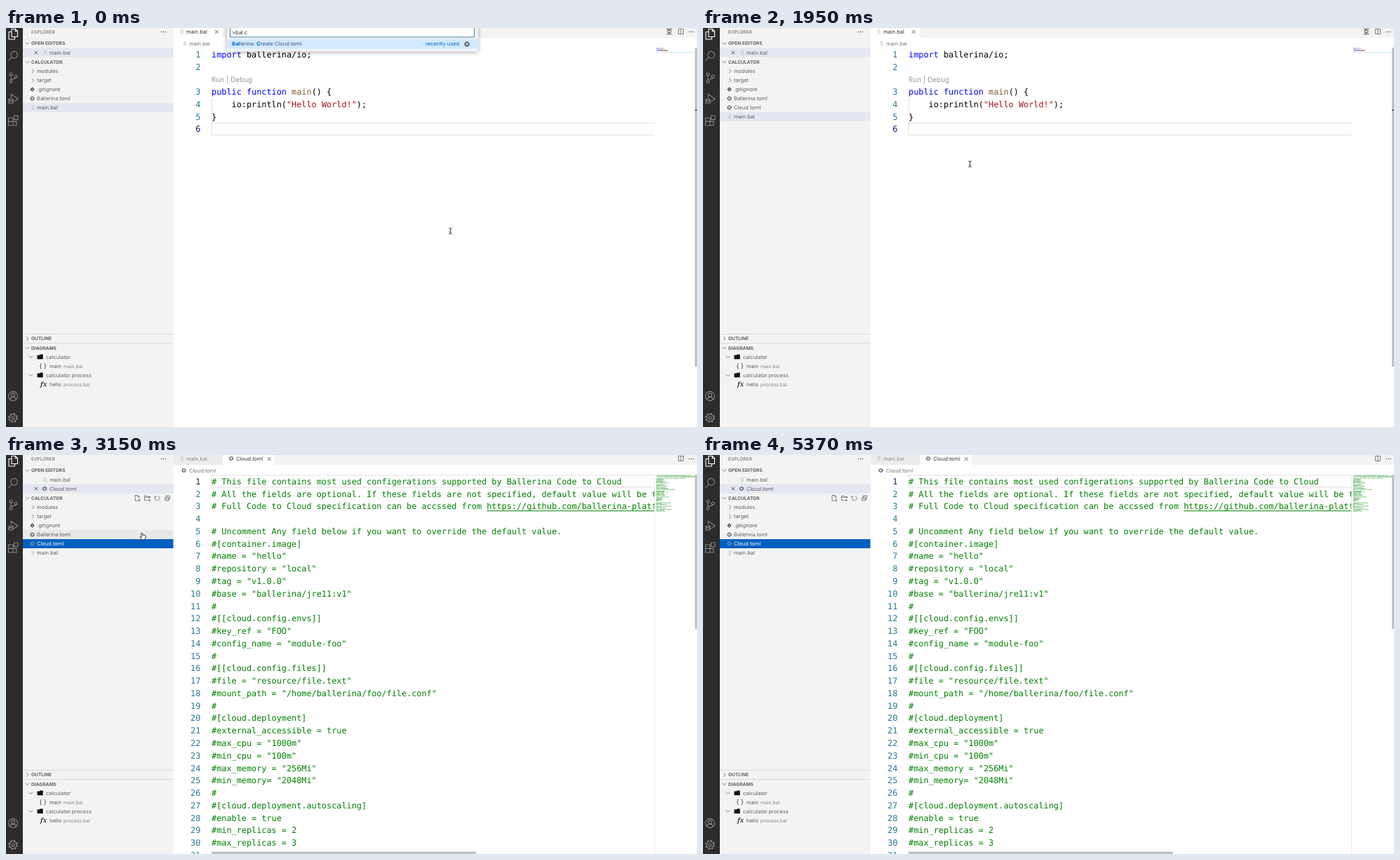
These frames come from a looping animation (985x569 px, 5.47 s). An HTML page:

```html
<!DOCTYPE html>
<html lang="en">
<head>
<meta charset="utf-8">
<title>Create Cloud.toml</title>
<style>
html, body { margin: 0; width: 100%; height: 100%; overflow: hidden; background: #fff; }
svg { display: block; position: absolute; left: 0; top: 0; }
text { font: 7.5px Inter, "Open Sans", sans-serif; fill: #616161; white-space: pre; text-rendering: geometricPrecision; }
text.head { font-size: 6.6px; font-weight: 700; }
text.cap { font-size: 6.6px; }
text.sub { font-size: 6.85px; fill: #858585; }
text.it { font-style: italic; }
text.on { fill: #fff; }
text.dark { fill: #333; }
text.dim { fill: #8a8a8a; }
text.crumb { fill: #767676; }
text.lens { font-size: 10px; fill: #999; }
text.code, text.num { font: 11.85px "DejaVu Sans Mono", "Liberation Mono", monospace; fill: #000; }
text.num { fill: #237893; text-anchor: end; }
text.num.cur { fill: #0b216f; }
text.cmt { fill: #008000; }
.kw { fill: #00f; } .fn { fill: #795e26; } .str { fill: #a31515; }
.hit { fill: #0066bf; font-weight: 700; }
.line { fill: none; stroke: #616161; stroke-width: .8; }
.bar { fill: none; stroke: #868686; stroke-width: 1.1; }

.first, .second, .palette, .caret, .cloud, .own, .tools, .hover, .picked, .fade, .late,
.away, .slider, .mouse, .beam, .hand, .arrow { animation: 5470ms step-end infinite; }
.first { animation-name: first; }
.second { animation-name: second; }
.palette { animation-name: palette; }
.caret { animation-name: caret; }
.cloud { animation-name: cloud; }
.own { animation-name: own; }
.tools { animation-name: tools; }
.hover { animation-name: hover; }
.picked { animation-name: picked; }
.fade { animation-name: fade; }
.late { animation-name: late; }
.away { animation-name: away; }
.slider { animation-name: slider; }
.mouse { animation-name: mouse; }
.beam { animation-name: beam; }
.hand { animation-name: hand; }
.arrow { animation-name: arrow; }

@keyframes first { 0% { opacity: 1 } 54.844%, 100% { opacity: 0 } }
@keyframes second { 0% { opacity: 0 } 54.844%, 100% { opacity: 1 } }
@keyframes palette { 0% { opacity: 1 } 2.742%, 100% { opacity: 0 } }
@keyframes caret {
  0%, 10.968%, 30.164%, 46.617%, 100% { opacity: 0 }
  2.742%, 19.195%, 38.391% { opacity: 1 }
}
@keyframes cloud { 0% { opacity: 0 } 16.453%, 100% { opacity: 1 } }
@keyframes own { 0% { transform: translateY(-13px) } 16.453%, 100% { transform: none } }
@keyframes tools { 0% { opacity: 0 } 41.133%, 100% { opacity: 1 } }
@keyframes hover { 0% { opacity: 0 } 43.875%, 100% { opacity: 1 } }
@keyframes picked { 0% { opacity: 0 } 52.102%, 100% { opacity: 1 } }
@keyframes fade { 0% { opacity: 1 } 52.102%, 100% { opacity: .35 } }
@keyframes late { 0% { opacity: 0 } 57.586%, 100% { opacity: 1 } }
@keyframes away { 0% { opacity: 1 } 65.813%, 100% { opacity: 0 } }
@keyframes slider { 0%, 98.171%, 100% { opacity: 0 } 81.901% { opacity: 1 } }
@keyframes beam { 0%, 68.555% { opacity: 1 } 41.133%, 81.901%, 100% { opacity: 0 } }
@keyframes hand { 0%, 68.555%, 100% { opacity: 0 } 41.133% { opacity: 1 } }
@keyframes arrow { 0%, 95.612%, 100% { opacity: 0 } 81.901% { opacity: 1 } }
@keyframes mouse {
  0% { transform: translate(633.5px, 289.5px) }
  27.422% { transform: translate(618px, 283px) }
  30.164% { transform: translate(555px, 259px) }
  32.906% { transform: translate(468px, 227px) }
  35.648% { transform: translate(380.5px, 194px) }
  38.391% { transform: translate(294px, 158px) }
  41.133% { transform: translate(222px, 132px) }
  43.875% { transform: translate(199px, 120px) }
  46.617% { transform: translate(195px, 116px) }
  65.813% { transform: translate(206px, 126px) }
  68.555% { transform: translate(262px, 148px) }
  71.297% { transform: translate(318px, 178px) }
  73.857% { transform: translate(354px, 197px) }
  79.341% { transform: translate(760px, 430px) }
  81.901% { transform: translate(955px, 542px) }
  84.643% { transform: translate(956px, 549px) }
  87.385% { transform: translate(957px, 556px) }
  90.127% { transform: translate(957px, 562px) }
  92.870%, 100% { transform: translate(958px, 569px) }
}
</style>
</head>
<body>
<svg id="stage" width="985" height="569" viewBox="0 0 985 569"></svg>
<script>
const text = (x, y, s, cls = '') => `<text x="${x}" y="${y}" class="${cls}">${s}</text>`;
const label = (x, mid, s, cls) => text(x, mid + 2.7, s, cls);
const rect = (x, y, w, h, fill, more = '') => `<rect x="${x}" y="${y}" width="${w}" height="${h}" fill="${fill}" ${more}/>`;
const path = (d, more = 'class="line"') => `<path d="${d}" ${more}/>`;
const at = (x, y, s) => `<g transform="translate(${x} ${y})">${s}</g>`;
const group = (cls, s) => `<g class="${cls}">${s}</g>`;

// Small icons
const right = (x, y) => at(x, y, path('M-1.4-2.8 1.4 0-1.4 2.8'));
const down = (x, y) => at(x, y, path('M-2.8-1.4 0 1.4 2.8-1.4'));
const cross = (x, y) => at(x, y, path('M-2.5-2.5 2.5 2.5M2.5-2.5-2.5 2.5', 'class="line" style="stroke:#444"'));
const doc = (x, y, c = '#c2c5c6') => at(x, y, path('M-2.2-2.6h4M-2.2-.9h4.6M-2.2.8h4M-2.2 2.5h4.6', `fill="none" stroke="${c}" stroke-width=".8"`));
const gear = (x, y, c = '#52636b', k = 1) => at(x, y, `<g transform="scale(${k})" fill="none" stroke="${c}">
  <circle r="2" stroke-width="1.2"/><circle r="3" stroke-width="1" stroke-dasharray="1.18 1.18"/></g>`);
const diamond = (x, y) => at(x, y, rect(-2.3, -2.3, 4.6, 4.6, '#41535b', 'rx=".5" transform="rotate(45)"') +
  path('M-.8-1.2 1 .6M0-.6V1.6', 'stroke="#f3f3f3" stroke-width=".7"'));
const folder = (x, y) => at(x, y, path('M-4-2.6H-.6L.4-3.6H4.2V3.2H-4Z', 'fill="#111"'));
const dots = (x, y) => [-3, 0, 3].map(d => `<circle cx="${x + d}" cy="${y}" r=".75" fill="#555"/>`).join('');

const tools = y =>
  at(187, y, path('M1-4H-3V4H0M1-4 3-2V0M1-4V-2H3M2.7 1V5M.7 3h4')) +
  at(201.5, y, path('M-.5 3.2H-4V-3.2H-1L0-2.2H4V0M-4-1.2H4M2.6 1V5M.6 3h4')) +
  at(215.5, y, path('M-2.4-2.4A3.4 3.4 0 1 0 1.6-3M-3.4-3.6V-1.6H-1')) +
  at(230, y, path('M-3.2-1.2H1.6V3.4H-3.2ZM-1.6-1.2V-3.4H3.4V1.6H1.6M-2 1.1H.4'));

function lowerPanels(dy) {
  return at(0, dy,
    rect(24, 436, 214.5, 1, '#dadada') + right(30.5, 443) + label(36, 442.7, 'OUTLINE', 'head') +
    rect(24, 449, 214.5, 1, '#dadada') + down(30.5, 456.3) + label(36, 455.8, 'DIAGRAMS', 'head') +
    down(35.5, 469) + folder(48.5, 469) + label(57, 469, 'calculator') +
    text(47.6, 484.8, '{ }', 'dark" style="font-size:9px') + label(62, 482, 'main') + label(82, 482, 'main.bal', 'sub') +
    down(35.5, 495) + folder(48.5, 495) + label(57, 495, 'calculator.process') +
    text(49, 511, 'fx', 'it dark" style="font:italic bold 9px Noto Serif,serif') +
    label(62, 508, 'hello') + label(82, 508, 'process.bal', 'sub'));
}

const explorerTop = rect(24, 0, 214.5, 569, '#f3f3f3') + label(36, 5, 'EXPLORER', 'cap') + dots(224.5, 5.5) +
  down(30.5, 22) + label(36, 21.7, 'OPEN EDITORS', 'head');

const treeTop = y => down(30.5, y) + label(36, y - .2, 'CALCULATOR', 'head') +
  right(38.5, y + 13) + label(44, y + 13, 'modules') +
  right(38.5, y + 26) + label(44, y + 26, 'target') +
  diamond(37.5, y + 39) + label(44, y + 39, '.gitignore') +
  gear(37.5, y + 52) + label(44, y + 52, 'Ballerina.toml');

const sideOne = explorerTop +
  rect(24, 28.5, 214.5, 13, '#e4e6f1') + cross(43, 35) + doc(56, 35) + label(62, 35, 'main.bal') +
  group('hover', rect(24, 107, 214.5, 13, '#e8e8e8')) +
  treeTop(48.5) + group('tools', tools(48.5)) +
  group('cloud', gear(37.5, 113.5) + label(44, 113.5, 'Cloud.toml')) +
  group('own', rect(24, 120, 214.5, 13, '#e4e6f1') + doc(38.5, 126.5) + label(44, 126.5, 'main.bal') +
    group('picked', rect(24, 120, 214.5, 13, '#0060c0') + doc(38.5, 126.5) + label(44, 126.5, 'main.bal', 'on'))) +
  lowerPanels(0);

const sideTwo = explorerTop +
  doc(56, 35) + label(62, 35, 'main.bal') +
  rect(24, 41.5, 214.5, 13, '#e4e6f1') + cross(43, 48) + gear(55, 48) + label(62, 48, 'Cloud.toml', 'it') +
  group('away', rect(24, 107, 214.5, 13, '#e8e8e8')) +
  treeTop(61.5) + tools(61.5) +
  rect(24, 120, 214.5, 13, '#0060c0') + gear(37.5, 126.5, '#6f93ad') + label(44, 126.5, 'Cloud.toml', 'on') +
  doc(38.5, 139.5) + label(44, 139.5, 'main.bal') +
  lowerPanels(13);

// Editors
const rowY = i => 41.8 + 17.77 * i;
const number = (i, n, cur) => text(277.3, rowY(i), n, cur ? 'num cur' : 'num');
const currentLine = y => rect(293, y, 640, 17, 'none', 'stroke="#e4e4e4" stroke-width="1.2"');
const split = at(962, 5, path('M-3.5-3.5h7v7h-7ZM0-3.5v7'));
const tabBar = rect(238.5, 0, 747, 14, '#f3f3f3');

const span = (c, s) => `<tspan class="${c}">${s}</tspan>`;
const program = [
  [0, 1, span('kw', 'import') + ' ballerina/io;'],
  [1, 2, ''],
  [3, 3, span('kw', 'public function') + ' ' + span('fn', 'main') + '() {'],
  [4, 4, '    io:println(' + span('str', '"Hello World!"') + ');'],
  [5, 5, '}'],
  [6, 6, '']
];

const miniOne = rect(927, 28.6, 4, .9, '#66f') + rect(931.5, 28.6, 7, .9, '#999') +
  rect(927, 30.8, 9, .9, '#66f') + rect(936.5, 30.8, 6, .9, '#a98') +
  rect(929, 32, 6, .9, '#999') + rect(935, 32, 9, .9, '#c66') + rect(927, 33.2, 1, .8, '#999') +
  rect(927, 34.4, 55, .9, '#c9e4f5');

const editorOne = tabBar + rect(239, 0, 70, 14, '#fff') +
  doc(251, 5) + label(257, 5, 'main.bal', 'dark') + cross(300.3, 5.5) +
  at(945.5, 5, path('M-4-3.5h8M-4 3.7h8M-2.4-1.4h4.8v2.8h-4.8ZM0-3.5v2M0 1.4v2', 'class="line" style="stroke:#333"')) +
  split + dots(977, 5.5) +
  doc(255, 22) + label(261, 22, 'main.bal', 'crumb') +
  `<g clip-path="url(#pane)">${currentLine(135.6)}</g>` +
  program.map(([i, n, s]) => number(i, n, n === 6) + text(293, rowY(i), s, 'code')).join('') +
  text(292.8, 76.5, 'Run | Debug', 'lens') + rect(293, 100, .7, 17.7, '#d3d3d3') +
  miniOne + group('fade', rect(982, 28, 3, 455, '#c1c1c1')) + rect(982, 116.6, 3, 1.4, '#444') +
  group('caret', rect(292.8, 135.3, 1.3, 17.6, '#000'));

const intro = '# Full Code to Cloud specification can be accssed from ';
const link = 'https://github.com/ballerina-platform/ballerina-spec';
const config = `# This file contains most used configerations supported by Ballerina Code to Cloud
# All the fields are optional. If these fields are not specified, default value will be taken from the compiler.
${intro}${link}

# Uncomment Any field below if you want to override the default value.
#[container.image]
#name = "hello"
#repository = "local"
#tag = "v1.0.0"
#base = "ballerina/jre11:v1"
#
#[[cloud.config.envs]]
#key_ref = "FOO"
#config_name = "module-foo"
#
#[[cloud.config.files]]
#file = "resource/file.text"
#mount_path = "/home/ballerina/foo/file.conf"
#
#[cloud.deployment]
#external_accessible = true
#max_cpu = "1000m"
#min_cpu = "100m"
#max_memory = "256Mi"
#min_memory= "2048Mi"
#
#[cloud.deployment.autoscaling]
#enable = true
#min_replicas = 2
#max_replicas = 3
#cpu = 50
#memory = 80
#
#[cloud.deployment.probes.liveness]
#port = 9091
#path = "/probes/healthz"
#
#[cloud.deployment.probes.readiness]
#port = 9091
#path = "/probes/readyz"
#
#[[cloud.deployment.storage.volumes]]
#name = "volume1"
#local_path = "files"`.split('\n');

const miniTwo = config.map((s, i) => [...s.matchAll(/\S+/g)].map(w =>
  rect(927 + w.index * .6, 28.5 + i * 1.19, w[0].length * .6, .8, '#008000', 'opacity=".6"')).join('')).join('');

const underlineX = 293 + intro.length * 7.134;
const editorTwo = tabBar + rect(239, 0, 70, 14, '#ececec') + rect(309, 0, 74, 14, '#fff') +
  doc(251, 5) + label(257, 5, 'main.bal', 'dim') +
  gear(321, 5) + label(328, 5, 'Cloud.toml', 'it dark') + cross(375.3, 5.5) + split + dots(977, 5.5) +
  gear(253.5, 22) + label(261, 22, 'Cloud.toml', 'crumb') +
  `<g clip-path="url(#pane)">${currentLine(28.9)}` +
  config.slice(0, 31).map((s, i) => number(i, i + 1, !i) + text(293, rowY(i), s, 'code cmt')).join('') +
  group('late', rect(underlineX, 79.2, 260, 1, '#008000')) + '</g>' +
  rect(924, 28, 1, 541, '#ececec') +
  `<g clip-path="url(#mini)">${group('late', miniTwo)}</g>` +
  group('slider', rect(925, 28, 57, 36.5, '#646464', 'fill-opacity=".2"')) +
  rect(982, 28, 3, 220, '#c1c1c1') + rect(293, 565.6, 377, 4, '#c1c1c1');

const activity = rect(0, 0, 24, 569, '#2c2c2c') +
  at(10, 9, path('M-2-7.5H3.5L6.5-4.5V3.5H-2ZM3.2-7.5V-4.3H6.5M-2-3.5H-6V7H2.5V3.5', 'class="bar" style="stroke:#fff"')) +
  at(10, 40, '<circle cx="1.6" cy="-1.8" r="4.8" class="bar"/>' + path('M-1.8 1.8-6.6 7', 'class="bar"')) +
  at(10, 71, '<g class="bar"><circle cx="-3" cy="-5" r="2"/><circle cx="-3" cy="5" r="2"/><circle cx="4" cy="-2" r="2"/></g>' +
    path('M-3-3V3M4 0C4 2.5-3 1-3 3', 'class="bar"')) +
  at(10, 101, path('M-2.6-2V-6.6L7 0 .8 4.4', 'class="bar"') +
    '<ellipse cx="-3" cy="3" rx="2.6" ry="3.3" class="bar"/>' + path('M-5.6 2.6h5.2M-7 0l2 1.2M1 0l-2 1.2M-7.2 3.4h1.6M-.4 3.4H1.2M-7 6.6l2-1.2M1 6.6l-2-1.2', 'class="bar"')) +
  at(10, 132, path('M-6.5-4H0V7H-6.5ZM-6.5 1.4H5V7H0M1.6-7H7V-1.4H1.6Z', 'class="bar"')) +
  at(10, 525, '<g class="bar"><circle r="6.6"/><circle cy="-1.6" r="2.5"/></g>' + path('M-4.2 5C-3.6 .2 3.6 .2 4.2 5', 'class="bar"')) +
  at(10, 556, '<g class="bar"><circle r="2"/><circle r="5"/><circle r="6.2" stroke-width="1.6" stroke-dasharray="2.43 2.44"/></g>');

const palette = group('palette',
  rect(315, -4, 358, 37.5, '#f3f3f3', 'style="filter:drop-shadow(0 1px 3px #0005)"') +
  rect(319.5, -4, 348, 17, '#fff', 'stroke="#3788ab" stroke-width="1"') + label(322, 6, '&gt;bal c', 'dark') +
  rect(315.5, 16, 357, 13.6, '#d2eaff') +
  label(322, 22.7, span('hit', 'Bal') + 'lerina: ' + span('hit', 'C') + 'reate Cloud.toml', '" style="fill:#33557a') +
  label(598, 22.7, 'recently used', '" style="fill:#0066bf') + gear(657, 23, '#555', 1.15));

const mouse = group('mouse',
  group('beam', path('M-2.2-4.2Q0-4.2 0-3Q0-4.2 2.2-4.2M0-3V3M-2.2 4.2Q0 4.2 0 3Q0 4.2 2.2 4.2M-1 1.4h2', 'fill="none" stroke="#222" stroke-width="1"')) +
  group('hand', path('M-2.2-4.4Q-1.2-5.4-.4-4.2L.2-1.6Q2.6-2 3.9-.8 4.4 1 3.2 3.2V4.9H-1.2L-3.8 1.2Q-3.6 0-2.2 .6L-1.6 1Z', 'fill="#fff" stroke="#222" stroke-width=".9" stroke-linejoin="round"')) +
  group('arrow', path('M-2-4.4V3.6L-.2 2 1 5 2.4 4.4 1.2 1.6H3.6Z', 'fill="#000" stroke="#fff" stroke-width=".6"')));

document.getElementById('stage').innerHTML =
  `<defs><clipPath id="pane">${rect(239, 28, 685.5, 541, '#000')}</clipPath>
   <clipPath id="mini">${rect(925, 28, 57, 541, '#000')}</clipPath></defs>` +
  rect(0, 0, 985, 569, '#fff') +
  group('first', sideOne + editorOne) + group('second', sideTwo + editorTwo) +
  activity + palette + mouse;
</script>
</body>
</html>
```
